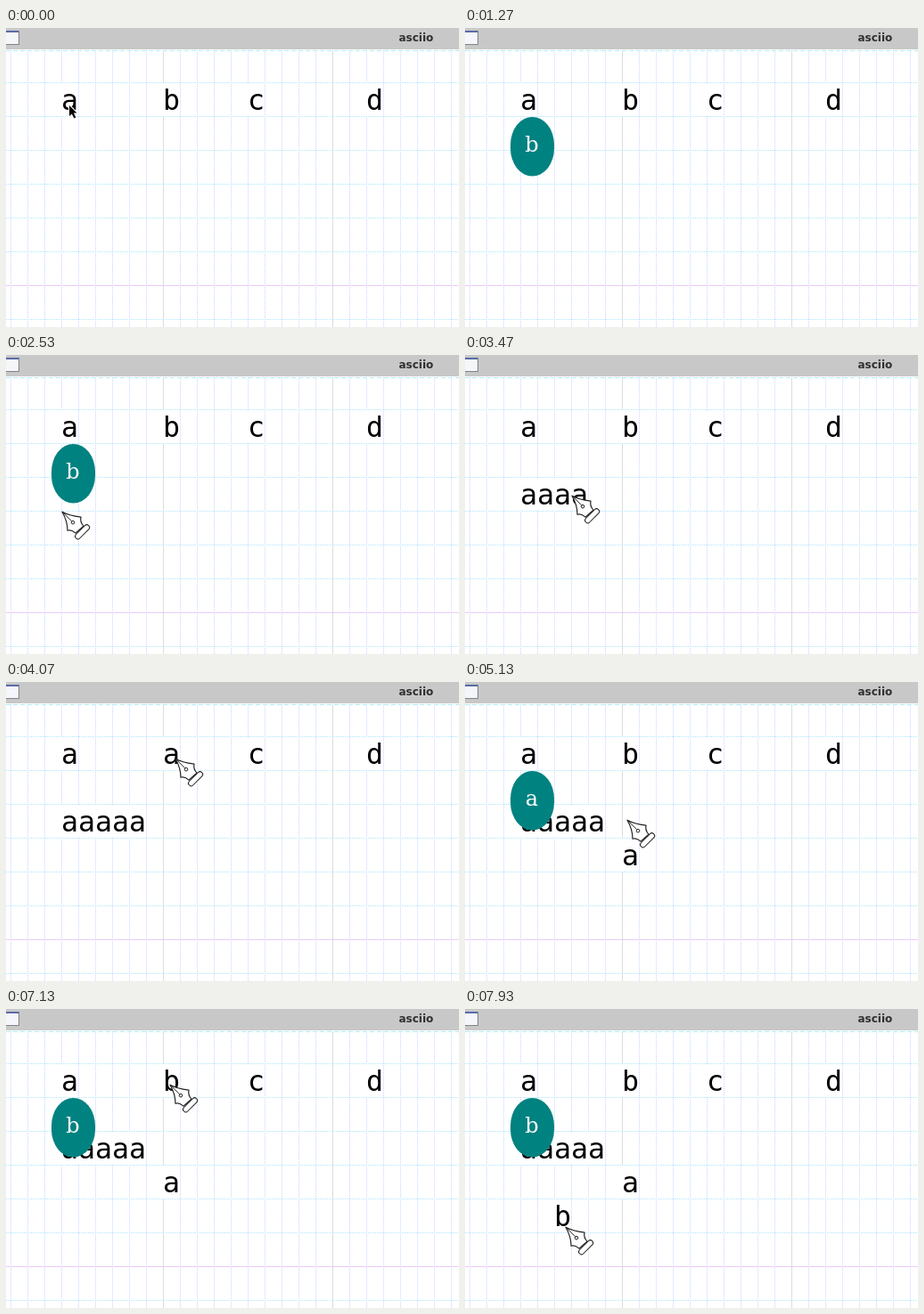
Animation, 508 px wide and 336 px high, one loop 8 s. Source, as an HTML page with a canvas:

```html
<!DOCTYPE html>
<html lang="en">
<head>
<meta charset="utf-8">
<title>asciio</title>
<style>
html, body { margin: 0; width: 100%; height: 100%; overflow: hidden; background: #fff; }
canvas { display: block; }
</style>
</head>
<body>
<canvas id="stage" width="508" height="336"></canvas>
<script>
const W = 508, H = 336, LOOP = 8000, STEP = 1000 / 15;
const CELL_W = 19, CELL_H = 38, LEFT = 62, TOP = 61, PITCH = 18.75;
const ctx = document.getElementById('stage').getContext('2d');

const moves = [], keys = [], tools = [], stamps = [];
const go = (start, time, x, y) => moves.push({ start, time, x, y });
const press = (start, label) => keys.push({ start, label });
const use = (start, cursor, glyph) => tools.push({ start, cursor, glyph });
const stamp = (start, ch, col, row) => stamps.push({ start, ch, col, row });

const arrow = new Path2D('M0 0V12L2.8 9.4L5.4 14.6L7.4 13.6L4.9 8.5H8.5Z');
const nib = new Path2D('M0 0C7 4 14 5 21 6C20 11 22 14 24 16L15 24C12 21 9 20 6 21C6 13 4 7 0 0Z');

// Pick up the "a" under the pointer.
stamp(0, 'a', 0, 0);
stamp(0, 'b', 6, 0);
stamp(0, 'c', 11, 0);
stamp(0, 'd', 18, 0);
use(0, drawArrow);
go(0, 1, 71, 87);
press(730, 'b');
go(930, 200, 71, 95);
use(1260, null);
go(1600, 50, 71, 88);
use(1660, drawPen, 'a');

// Draw a row of it, then hover over "b".
go(2330, 200, 63, 175);
go(2530, 340, 70, 156);
press(2870, '');
go(3270, 330, 148, 158);
for (let col = 0; col < 5; col++) stamp(3270 + col * 65, 'a', col, 2);
go(3670, 390, 190, 85);
go(4390, 400, 188, 198);
stamp(4800, 'a', 6, 3);
press(5000, 'a');
go(5000, 130, 182, 154);
go(5130, 270, 188, 88);
go(5530, 270, 186, 173);

// Leave the pen, then pick up "b" and place it.
press(5800, 'Esc');
use(5800, drawArrow, 'a');
use(6200, drawArrow);
go(6000, 530, 184, 84);
press(6530, 'b');
use(6730, drawPen, 'b');
go(7130, 470, 117, 200);
go(7850, 80, 113, 244);

const latest = (list, t) => list.findLast(e => e.start <= t);

function pointerAt(t) {
  const i = moves.findLastIndex(m => m.start <= t);
  const to = moves[i], from = moves[Math.max(i - 1, 0)];
  const k = Math.min((t - to.start) / to.time, 1);
  const ease = i ? k * k * (3 - 2 * k) : 1;
  return {
    x: Math.round(from.x + (to.x - from.x) * ease),
    y: Math.round(from.y + (to.y - from.y) * ease),
    resting: k === 1
  };
}

function line(x0, y0, x1, y1, color, dash = []) {
  ctx.strokeStyle = color;
  ctx.lineWidth = 1;
  ctx.setLineDash(dash);
  ctx.beginPath();
  ctx.moveTo(x0, y0);
  ctx.lineTo(x1, y1);
  ctx.stroke();
  ctx.setLineDash([]);
}

function drawGrid() {
  for (let x = 5; x < W; x += CELL_W) {
    const major = (x - 176) % 190 === 0;
    line(x + .5, 25, x + .5, H, major ? '#d8e0d6' : '#c4d8ff', major ? [] : [1, 1]);
  }
  for (let y = TOP; y < H; y += CELL_H) {
    const major = y === TOP + 6 * CELL_H;
    line(0, y + .5, W, y + .5, major ? '#eccbfa' : '#ace6ff', major ? [] : [1, 1]);
  }
  line(0, 25.5, W, 25.5, '#aeeef6', [5, 3]);
}

function drawTitleBar() {
  ctx.fillStyle = '#c8c8c8';
  ctx.fillRect(0, 0, W, 24);
  ctx.fillStyle = '#808488';
  ctx.fillRect(0, 3, 15, 16);
  ctx.fillStyle = '#f4f6fa';
  ctx.fillRect(0, 4, 14, 14);
  ctx.fillStyle = '#5a6aa8';
  ctx.fillRect(0, 3, 14, 2);
  ctx.fillStyle = '#303030';
  ctx.font = 'bold 12px "DejaVu Sans", sans-serif';
  ctx.textAlign = 'left';
  ctx.fillText('asciio', 440.5, 15);
}

function drawGlyph(ch, col, row) {
  const x = LEFT + col * CELL_W, y = TOP + row * CELL_H;
  ctx.fillStyle = '#fff';
  ctx.fillRect(x, y + 1, CELL_W, CELL_H - 1);
  ctx.fillStyle = '#000';
  ctx.font = '31.56px "DejaVu Sans Mono", monospace';
  ctx.textAlign = 'left';
  ctx.fillText(ch, x, y + 31);
}

function drawKey(label) {
  const w = 49 + (label.length - 1) * PITCH;
  ctx.fillStyle = '#008280';
  ctx.beginPath();
  ctx.roundRect(51, 100, w, 66.5, { x: Math.min(30, w / 2), y: 31 });
  ctx.fill();
  ctx.fillStyle = '#fff';
  ctx.font = '24px "DejaVu Serif", serif';
  ctx.textAlign = 'center';
  [...label].forEach((ch, i) => ctx.fillText(ch, 75 + i * PITCH, 138.5));
}

function drawArrow() {
  ctx.strokeStyle = '#fff';
  ctx.lineWidth = 2;
  ctx.stroke(arrow);
  ctx.fillStyle = '#000';
  ctx.fill(arrow);
}

function drawPen() {
  ctx.translate(0, 1.2);
  ctx.fillStyle = '#fff';
  ctx.strokeStyle = '#222';
  ctx.lineWidth = 1.2;
  ctx.lineJoin = 'round';
  ctx.fill(nib);
  ctx.stroke(nib);
  line(0, 0, 10.5, 10.5, '#222');
  ctx.beginPath();
  ctx.arc(12, 12, 1.8, 0, Math.PI * 2);
  ctx.fill();
  ctx.stroke();
  ctx.translate(22.6, 22.6);
  ctx.rotate(-Math.PI / 4);
  ctx.beginPath();
  ctx.roundRect(-10, -3, 20, 6, 2.8);
  ctx.fill();
  ctx.stroke();
}

function draw(t) {
  ctx.fillStyle = '#fff';
  ctx.fillRect(0, 0, W, H);
  drawGrid();
  drawTitleBar();
  for (const s of stamps) if (s.start <= t) drawGlyph(s.ch, s.col, s.row);

  // A resting pen previews its glyph in the cell below it.
  const { x, y, resting } = pointerAt(t);
  const { cursor, glyph } = latest(tools, t);
  if (glyph && resting) {
    drawGlyph(glyph, Math.floor((x - LEFT) / CELL_W), Math.floor((y - TOP) / CELL_H));
  }
  if (cursor) {
    ctx.save();
    ctx.translate(x, y);
    cursor();
    ctx.restore();
  }
  const key = latest(keys, t);
  if (key && key.label) drawKey(key.label);
}

const start = performance.now();
function tick() {
  const t = (performance.now() - start) % LOOP;
  draw(Math.floor((t + 4) / STEP) * STEP % LOOP);
  requestAnimationFrame(tick);
}
tick();
</script>
</body>
</html>
```
